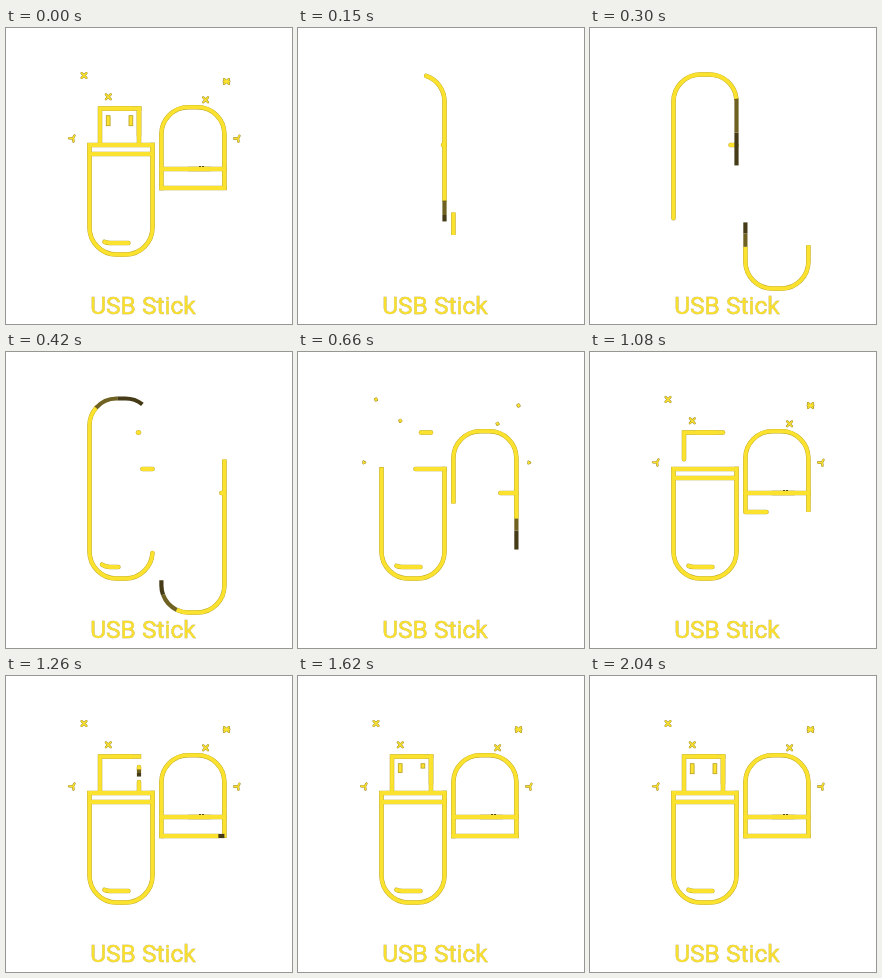
Write an HTML page that moves like this. It is 286 by 296 pixels and loops after 3.57 s.

```html
<!DOCTYPE html>
<html lang="en">
<head>
<meta charset="utf-8">
<title>USB Stick</title>
<style>
  html, body { margin: 0; width: 100%; height: 100%; overflow: hidden; background: #fff; }
  svg { display: block; width: 100%; height: 100%; }
  path { fill: none; }
  text { font: 400 24.5px Roboto, sans-serif; fill: #f8df2d; stroke: #a8932a; stroke-width: .4px; paint-order: stroke; }
  #edge path { stroke: #b59e26; stroke-width: 4.5; }
  #core path { stroke: #fae22f; stroke-width: 3.8; }
  #fade path { stroke-width: 4.2; }
  #stars .rim { stroke: #8f7b1e; stroke-width: 2.3; }
  #stars .ray { stroke: #fae22f; stroke-width: 1.5; }
  #stars path { stroke-linecap: round; vector-effect: non-scaling-stroke; }
</style>
</head>
<body>
<svg viewBox="0 0 286 296">
  <g id="edge"></g>
  <g id="core"></g>
  <g id="fade"></g>
  <g id="slots"></g>
  <path id="nick" d="M193 138.5h2M196 138.5h2" stroke="#5b4c16" stroke-width="1"/>
  <g id="stars"></g>
  <text x="84.2" y="286.3">USB Stick</text>
</svg>
<script>
const LOOP = 3570, STEP = 30, BLUR = 45;
const DARK = '#453b17', DIM = '#6f6122';

const $ = id => document.getElementById(id);

function add(parent, tag, attrs) {
  const el = document.createElementNS('http://www.w3.org/2000/svg', tag);
  for (const k in attrs) el.setAttribute(k, attrs[k]);
  parent.appendChild(el);
  return el;
}

// Smooth monotone curve through [time, value] keys
function curve(...keys) {
  const n = keys.length - 1;
  const rise = i => (keys[i + 1][1] - keys[i][1]) / (keys[i + 1][0] - keys[i][0]);
  const slope = keys.map((_, i) => {
    if (i === 0 || i === n) return 0;
    const a = rise(i - 1), b = rise(i);
    return a * b > 0 ? 2 * a * b / (a + b) : 0;
  });
  return t => {
    if (t <= keys[0][0]) return keys[0][1];
    if (t >= keys[n][0]) return keys[n][1];
    let i = 0;
    while (t > keys[i + 1][0]) i++;
    const [t0, v0] = keys[i], [t1, v1] = keys[i + 1];
    const d = t1 - t0, p = (t - t0) / d, q = 1 - p;
    return v0 * q * q * (1 + 2 * p) + v1 * p * p * (3 - 2 * p)
      + d * p * q * (slope[i] * q - slope[i + 1] * p);
  };
}

const zero = () => 0;

// Quarter turn, counterclockwise
const turn = (dx, dy) => `a27 27 0 0 0 ${dx} ${dy}`;

// Each stroke shows the part of its path between tail and head;
// lead is a dark stub ahead of the head near its end.
const strokes = [
  { // body
    d: `M146.5 196V73.5${turn(-27, -27)}h-9${turn(-27, 27)}V199.5${turn(27, 27)}h9${turn(27, -27)}V117`,
    head: curve([30, 0], [150, 156], [420, 434], [660, 518.6]),
    tail: curve([60, 0], [150, 9], [420, 173], [630, 259.8]), end: 660
  },
  { // cap
    d: `M155.4 182V233.5${turn(27, 27)}h9${turn(27, -27)}V106.2${turn(-27, -27)}h-9${turn(-27, 27)}V160`,
    head: curve([100, 0], [150, 25], [420, 271], [660, 411], [780, 420.6]),
    tail: curve([150, 0], [420, 61], [660, 200], [760, 218.8]), end: 1260, cap: 'butt'
  },
  { // body top
    d: 'M146.5 117H83.5',
    head: curve([120, 0], [150, 1.5], [420, 10], [660, 29], [900, 49], [990, 63]),
    tail: zero, lead: 15, end: 990
  },
  { // body band
    d: 'M83.5 126H146.5',
    head: curve([720, 32], [900, 40], [1080, 63]),
    tail: curve([720, 32], [900, 12], [960, 0]), end: 1080
  },
  { // cap band, right
    d: 'M218.4 141H155.4',
    head: curve([390, 0], [420, 3], [660, 16], [900, 26], [1000, 34]),
    tail: zero, end: 1000
  },
  { // cap band, left
    d: 'M218.4 141H155.4',
    head: curve([690, 30], [900, 54], [1000, 63]),
    tail: curve([690, 30], [900, 27], [1000, 16]), end: 1000
  },
  { // cap bottom
    d: 'M155.4 160H218.4',
    head: curve([930, 0], [1260, 57], [1350, 63]),
    tail: zero, lead: 7, end: 1350
  },
  { // plug top, right
    d: 'M133 80.5H94V116',
    head: curve([390, 0], [420, 1], [660, 10], [900, 17], [1000, 26]),
    tail: zero, end: 1260
  },
  { // plug top and left
    d: 'M133 80.5H94V116',
    head: curve([690, 24], [900, 42], [1200, 74.5]),
    tail: curve([690, 24], [900, 18], [1000, 8]), end: 1260
  },
  { // plug, lower right
    d: 'M133 116V80.5',
    head: curve([1080, 0], [1260, 10], [1560, 35.5]),
    tail: zero, end: 1560
  },
  { // plug, upper right
    d: 'M133 116V80.5',
    head: curve([1200, 23], [1260, 25], [1440, 35.5]),
    tail: curve([1200, 23], [1260, 19], [1400, 10]), end: 1560
  },
  { // shine
    d: 'M88 200Q92 214.5 104 215H123',
    head: curve([240, 0], [420, 32], [600, 42]),
    tail: curve([240, 10], [420, 14], [600, 18]), end: Infinity
  }
];

for (const s of strokes) {
  s.lines = ['edge', 'core'].map(id => add($(id), 'path', { d: s.d }));
  s.dark = add($('fade'), 'path', { d: s.d, stroke: DARK });
  s.dim = add($('fade'), 'path', { d: s.d, stroke: DIM });
  s.length = s.dark.getTotalLength();
}

const slots = [[100.3, 1320, 1700], [123, 1380, 1900]].map(([x, from, to]) => ({
  grow: curve([from, 0], [to, 10]),
  el: add($('slots'), 'rect', { x, y: 87.7, width: 3.8, fill: '#fae22f', stroke: '#b89d1e', 'stroke-width': .8 })
}));

const CROSS = 'M-2.4-2.4L2.4 2.4M-2.4 2.4L2.4-2.4';
const FORK = 'M-3 0H1M2.5-2.8L1 0L1.5 3.2';
const starScale = curve([600, 0], [660, .3], [900, .82], [1050, 1]);
const starAngle = curve([600, 60], [900, 20], [1100, 0]);
const stars = [
  [78, 47.5, CROSS], [102.3, 68.8, CROSS], [199.6, 71.8, CROSS],
  [220.5, 53.5, CROSS + 'M-2.8 0H2.8'], [66, 110.3, FORK], [231, 110.5, FORK]
].map(([x, y, d]) => {
  const el = add($('stars'), 'g', {});
  add(el, 'path', { d, class: 'rim' });
  add(el, 'path', { d, class: 'ray' });
  return { x, y, el };
});

const show = (el, on) => { el.style.display = on ? '' : 'none'; };

function span(el, a, b, cap) {
  show(el, b - a > .3);
  el.setAttribute('stroke-dasharray', `${Math.max(b - a, 0)} 2000`);
  el.setAttribute('stroke-dashoffset', -a);
  el.setAttribute('stroke-linecap', cap);
}

function drawStroke(s, t) {
  const head = s.head(t), mid = s.tail(t);
  const before = s.tail(t - BLUR), after = s.tail(t + BLUR);
  const low = Math.min(before, after), high = Math.min(Math.max(before, after), head);
  const cap = t >= s.end ? 'square' : s.cap || 'round';
  for (const el of s.lines) span(el, high, head, cap);

  const left = s.length - head;
  if (s.lead && left > .5 && left <= s.lead) {
    span(s.dark, head, s.length, 'butt');
    show(s.dim, false);
  } else {
    const moving = high - low > 3;
    span(s.dark, low, moving ? Math.min(mid, high) : low, 'butt');
    span(s.dim, mid, moving ? high : mid, 'butt');
  }
}

function draw(time) {
  // The loop opens on one step of the finished picture
  const t = time < STEP ? LOOP : time;
  for (const s of strokes) drawStroke(s, t);
  for (const { el, grow } of slots) {
    const h = grow(t);
    show(el, h > 0);
    el.setAttribute('height', h);
  }
  const k = starScale(t), turned = starAngle(t);
  show($('stars'), k > 0);
  for (const { x, y, el } of stars) {
    el.setAttribute('transform', `translate(${x} ${y}) rotate(${turned}) scale(${k})`);
  }
  show($('nick'), t >= 900);
}

const start = performance.now();
function tick() {
  const t = (performance.now() - start) % LOOP;
  draw(Math.floor(t / STEP) * STEP);
  requestAnimationFrame(tick);
}
tick();
</script>
</body>
</html>
```
